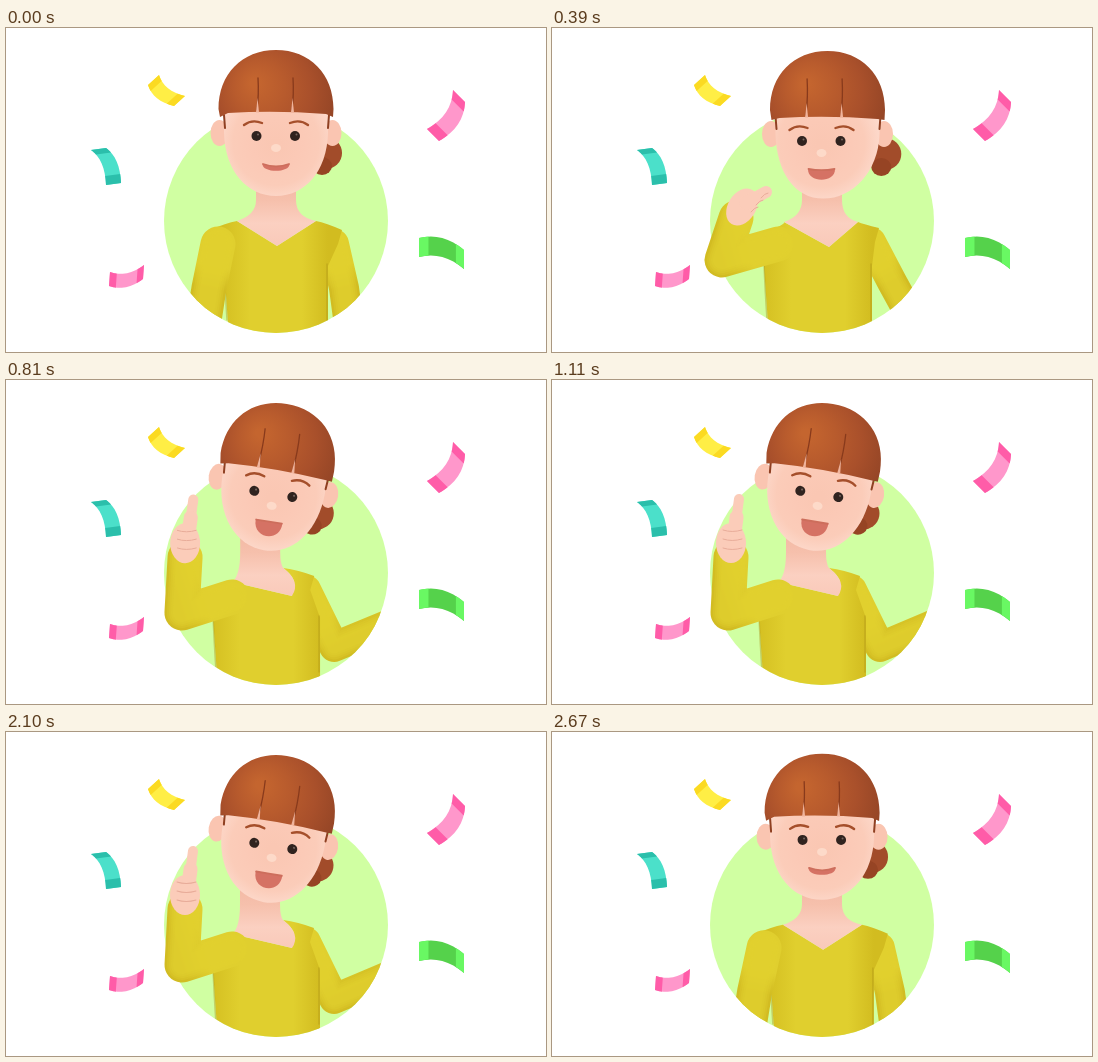
Animation, 540 px wide and 324 px high, one loop 2700 ms. Source, as an HTML page with a canvas:

```html
<!DOCTYPE html>
<html lang="en">
<head>
<meta charset="utf-8">
<title>Thumbs up</title>
<style>
html, body { margin: 0; width: 100%; height: 100%; overflow: hidden; background: #fff; }
canvas { display: block; }
</style>
</head>
<body>
<canvas id="stage" width="540" height="324"></canvas>
<script>
const ctx = document.getElementById('stage').getContext('2d');
const LOOP = 2700;
const TAU = Math.PI * 2;
const RAD = Math.PI / 180;
const SKIN = '#fbccb9';
const KNIT = '#e0cf2e';

const mix = (a, b, k) => a + (b - a) * k;

// Smooth step from 0 to 1 between two times.
function ramp(t, from, to) {
  const u = Math.min(1, Math.max(0, (t - from) / (to - from)));
  return u * u * (3 - 2 * u);
}

// Three controls drive the whole figure: arm raised, body leaning, hop on the way back.
function poseAt(t) {
  const raise = ramp(t, 0, 390) - ramp(t, 2100, 2430);
  const lean = ramp(t, 390, 840) - ramp(t, 2100, LOOP);
  const hop = ramp(t, 2130, 2430) - ramp(t, 2430, LOOP);
  const by = (rest, r, l, h) => rest + r * raise + l * lean + h * hop;
  return {
    raise, lean,
    head: { x: by(270, 5.5, -6.5, 4), y: by(95, 1, 0, -7), tilt: by(0, 0, 9.4, 1) * RAD },
    face: { x: by(0, -6, 7.5, -1.5), y: by(0, 4, 1, 4), mouth: by(7, 4, 4, 0) },
    neck: by(270, 0, -16, 3),
    collar: {
      left: [by(231, 1, -6, 0), by(193, 1, 8, -7)],
      point: [by(271, 6, 9, 2), by(218, 1, -3, -6)],
      right: [by(310, -4, -29, 5), by(193, 1, -6, -6)],
    },
    waist: [by(218, -6, -5, -3), by(322, -2, -6, -2)],
    leftArm: {
      shoulder: [by(212, 14, 0, 2), by(216, 0, 1, -6)],
      elbow: [by(203, -33, 6, -13), by(260, -28, 1, -7)],
      wrist: [by(195, -11, -5, -18), by(312, -122, -13, -20)],
    },
    rightArm: {
      shoulder: [by(328, -9, -19, 0), by(216, -2, -4, -6)],
      elbow: [by(338, 2, -12, -1), by(260, -6, 13, -10)],
      wrist: [by(345, 12, 33, -8), by(312, -27, -44, -4)],
    },
  };
}

function fill(d, color) {
  ctx.fillStyle = color;
  ctx.fill(new Path2D(d));
}

function stroke(d, color, width) {
  ctx.strokeStyle = color;
  ctx.lineWidth = width;
  ctx.lineCap = ctx.lineJoin = 'round';
  ctx.stroke(new Path2D(d));
}

function oval(x, y, rx, ry, color, turn = 0) {
  ctx.fillStyle = color;
  ctx.beginPath();
  ctx.ellipse(x, y, rx, ry, turn, 0, TAU);
  ctx.fill();
}

function shade(gradient, ...colors) {
  colors.forEach((c, i) => gradient.addColorStop(i / (colors.length - 1), c));
  return gradient;
}

function layer(draw) {
  ctx.save();
  draw();
  ctx.restore();
}

function disc() {
  const path = new Path2D();
  path.arc(270, 193, 112, 0, TAU);
  return path;
}

// A curve swept by (dx, dy), with a second colour at both ends.
function drawRibbon(start, bend, end, [dx, dy], middle, tips) {
  const at = t => [0, 1].map(i => mix(mix(start[i], bend[i], t), mix(bend[i], end[i], t), t));
  const part = (from, to, color) => {
    const edge = Array.from({ length: 9 }, (_, k) => at(mix(from, to, k / 8)));
    const swept = edge.map(([x, y]) => [x + dx, y + dy]).reverse();
    fill('M' + [...edge, ...swept].join('L') + 'Z', color);
  };
  part(0, 1, middle);
  part(0, .2, tips);
  part(.81, 1, tips);
}

function drawConfetti() {
  drawRibbon([153, 47], [158, 63], [179, 68], [-11, 10], '#ffee45', '#fbda22');
  drawRibbon([85, 122], [99, 132], [100, 157], [15, -2], '#4be0ca', '#2bbfab');
  drawRibbon([447, 62], [446, 87], [421, 101], [12, 12], '#ff97cb', '#ff5ca8');
  drawRibbon([413, 210], [437, 204], [458, 222], [0, 19], '#55d24b', '#69f863');
  drawRibbon([104, 244], [121, 250], [138, 237], [-1, 14], '#ff97cb', '#ff5ca8');
}

function drawArm({ shoulder, elbow, wrist }, width) {
  const d = `M${shoulder}L${elbow}L${wrist}`;
  const rim = shade(ctx.createLinearGradient(...shoulder, ...elbow), KNIT, KNIT, '#d2bc22');
  stroke(d, rim, width);
  ctx.globalAlpha = .3;
  for (let inset = 5; inset <= 17; inset += 4) stroke(d, KNIT, width - inset);
  ctx.globalAlpha = 1;
}

// Right edge of the neckline, bulging as the body turns.
function neckEdge({ point, right }, lean) {
  return [(point[0] + right[0]) / 2 + 14 * lean, (point[1] + right[1]) / 2];
}

function drawTorso({ collar, waist: [wl, wr], leftArm, rightArm, lean }) {
  const { left, point, right } = collar;
  const [ax, ay] = leftArm.shoulder, [bx, by] = rightArm.shoulder;
  const color = shade(ctx.createLinearGradient(wl, 0, wr, 0), '#d5c022', KNIT, KNIT, KNIT, '#d2bc20');
  fill(`M${left}Q${ax + 8} ${left[1] + 2} ${ax - 8} ${ay - 14}L${ax - 4} ${ay}
    L${wl} 238L${wl + 5} 310H${wr}V238L${bx + 4} ${by}
    L${bx + 8} ${by - 14}Q${bx - 8} ${right[1] + 2} ${right}
    Q${neckEdge(collar, lean)} ${point}Z`, color);
  stroke(`M${wl} 236Q${wl + 1} 262 ${wl + 3} 292M${wr - 1} 236V292`, '#a88f1466', 1.5);
}

function drawNeck({ collar, neck, lean }) {
  const { left, point, right } = collar;
  const color = shade(ctx.createLinearGradient(0, 150, 0, 218), '#f2b8a3', '#f6c0ac', '#fbd0c1', '#f9c9b9');
  fill(`M${neck - 20} 148V172Q${neck - 20} ${left[1] - 6} ${left}L${point}
    Q${neckEdge(collar, lean)} ${right}Q${neck + 20} ${right[1] - 4} ${neck + 20} 172V148Z`, color);
}

// A fist that turns upright while the thumb goes out.
function drawHand({ leftArm, raise, lean }) {
  ctx.translate(...leftArm.wrist);
  ctx.rotate(Math.PI * (1 - raise));
  const blend = (fist, thumb) => mix(fist, thumb, lean);
  const base = [blend(10, 4), blend(-15, -28)], tip = [blend(30, 8), blend(-26, -58)];
  oval(blend(6, 0), blend(-11, -14), blend(14, 15), 20, SKIN, blend(.55, 0));
  stroke(`M${base}L${tip}`, SKIN, blend(12, 10));
  stroke(`M${base}L${mix(base[0], tip[0], .4)} ${mix(base[1], tip[1], .4)}`, SKIN, 14);
  for (let i = 0; i < 3; i++) {
    const x = blend(15 + i * 5, -8), y = blend(-6 - i * 7, -27 + i * 9);
    stroke(`M${x} ${y}q${blend(4, 9)} ${blend(-5, 3)} ${blend(7, 19)} ${blend(-5, 0)}`, '#e8ac99', 1);
  }
}

function drawHead({ head, face, lean }) {
  ctx.translate(head.x, head.y);
  ctx.rotate(head.tilt);

  const bun = -face.x * 1.3;
  oval(50 + bun, 30, 16, 16, '#a24c2a');
  oval(46 + bun, 43, 10, 9, '#964424');
  for (const side of [-1, 1]) oval(side * 56.5, 10, 9, 13, '#fac5b1');

  const chin = face.x * .7, bottom = 73 + face.y * .4;
  fill(`M-52 -20V10C-51 48 ${chin - 29} ${bottom} ${chin} ${bottom}
    C${chin + 29} ${bottom} 51 48 52 10V-20Z`,
    shade(ctx.createRadialGradient(face.x, 22, 5, face.x, 18, 62), '#fac7b3', '#fbc9b6', SKIN, '#fddbce'));

  const fringe = face.y - 11, edge = face.y * .5 - 6;
  stroke('M-52 -8L-51 5M53 -8L52 5', '#8f4022', 2);
  fill(`M-56 ${edge}L-57.5 -14C-57.5 -49 -34 -73 0 -73C34 -73 57.5 -49 57.5 -14L57 ${edge}
    L50 ${fringe + 2}Q0 ${fringe - 2} -48 ${fringe + 1}Z`,
    shade(ctx.createRadialGradient(-22, -40, 4, -6, -30, 68), '#c4652f', '#b85b2d', '#a9502b', '#944526'));

  for (const x of [-18, 17]) {
    const slit = x + face.x * .4;
    stroke(`M${slit} -45Q${slit + 1} -28 ${slit - 1} ${fringe - 2}`, '#883a1c', 1.3);
    fill(`M${slit - 2} ${fringe + .5}L${slit - .5} ${fringe - 14}L${slit + 1} ${fringe + .5}Z`, '#f0b49c');
  }

  ctx.translate(face.x, face.y);
  const brow = 2 * lean, lift = -3 * lean;
  stroke(`M${brow - 32} ${2 + lift}q8 -6 18 -2M${brow + 14} ${lift}q10 -4 18 2`, '#a54f2b', 2.4);
  for (const x of [-19.5, 19]) {
    oval(x, 13, 5, 5, '#30231f');
    oval(x + 1.5, 11.5, 1, 1, '#76655e');
  }
  oval(0, 25, 5, 4, '#fddac9');
  const sag = 41 + (15 - face.mouth) * .6, low = 41 + face.mouth * 1.3;
  fill(`M-13.5 41Q0 ${sag} 13.5 41C14 ${low} -14 ${low} -13.5 41Z`, '#d57264');
  stroke(`M-13 41Q0 ${sag} 13 41`, '#cd6e5c', 1.8);
}

function render(t) {
  const pose = poseAt(t);

  ctx.fillStyle = '#fff';
  ctx.fillRect(0, 0, 540, 324);
  drawConfetti();
  ctx.fillStyle = '#d0ffa2';
  ctx.fill(disc());

  layer(() => {
    ctx.clip(disc());
    drawArm(pose.rightArm, 30);
    drawTorso(pose);
  });
  drawNeck(pose);

  // The raised arm may leave the disc on the left.
  layer(() => {
    const area = disc();
    area.rect(0, 0, 260, 190 + 70 * pose.raise);
    ctx.clip(area);
    drawArm(pose.leftArm, 35);
    drawHand(pose);
  });

  layer(() => drawHead(pose));
}

function tick() {
  render(performance.now() % LOOP);
  requestAnimationFrame(tick);
}
tick();
</script>
</body>
</html>
```
